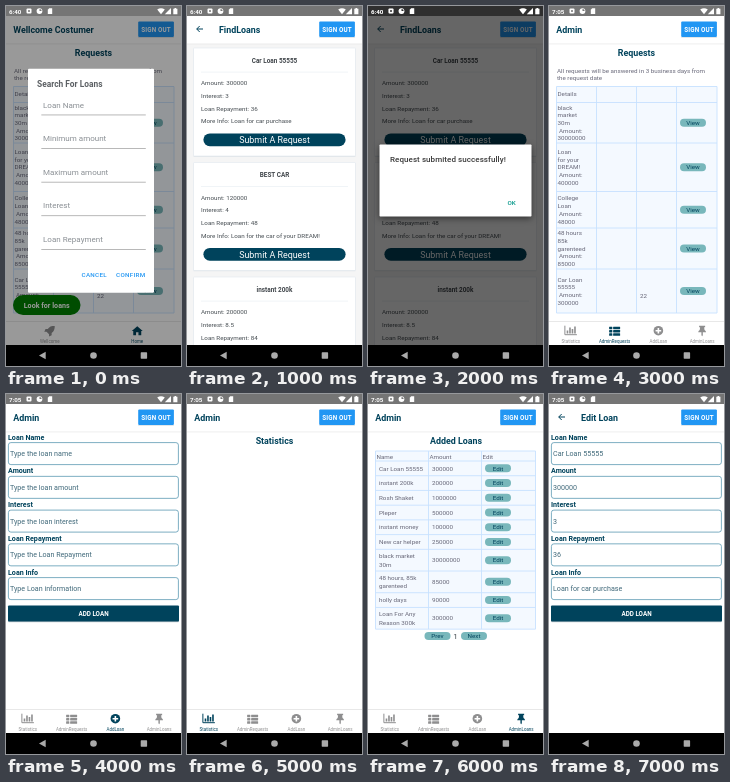
Recreate the animation shown at these times as an HTML page. Size 175x360 px, loop 8000 ms.

```html
<!DOCTYPE html>
<html lang="en">
<head>
<meta charset="utf-8">
<title>Loan app</title>
<style>
  html, body { margin: 0; width: 100%; height: 100%; overflow: hidden; background: #fff; }
  svg { display: block; width: 100%; height: 100%; font-family: Roboto, sans-serif; }
  .raised { filter: drop-shadow(0 2px 3px rgba(0, 0, 0, .5)); }
</style>
</head>
<body>
<svg id="stage" viewBox="0 0 175 360"></svg>
<script>
const NAVY = '#00435c', BLUE = '#2196f3', GREY = '#8e8e8f', TEAL = '#78b7bb';
const INK = '#444b50', CELL = '#667', LINE = '#c8e1ff';
const stage = document.getElementById('stage');

const rect = (x, y, w, h, fill, rx = 0, more = '') =>
  `<rect x="${x}" y="${y}" width="${w}" height="${h}" fill="${fill}" rx="${rx}" ${more}/>`;
const text = (s, x, y, size, fill, weight = 400, anchor = 'start', gap = 0) =>
  `<text x="${x}" y="${y}" font-size="${size}" fill="${fill}" font-weight="${weight}" text-anchor="${anchor}" letter-spacing="${gap}">${s}</text>`;
const mid = (s, x, y, size, fill, weight) => text(s, x, y, size, fill, weight, 'middle');
const path = (d, fill, more = '') => `<path d="${d}" fill="${fill}" ${more}/>`;
const line = (d, color, w) => path(d, 'none', `stroke="${color}" stroke-width="${w}"`);
const circle = (x, y, r, fill) => `<circle cx="${x}" cy="${y}" r="${r}" fill="${fill}"/>`;
const dim = (y, alpha) => rect(0, y, 175, 339 - y, '#000', 0, `opacity="${alpha}"`);

function statusIcons(time, bg = '#757575') {
  return text(time, 3, 7.5, 6.2, '#fff', 700) +
    rect(20.5, 2.6, 5, 5, '#fff', 1) + circle(23, 5.1, 1, bg) +
    circle(33.5, 5.1, 2.9, '#fff') + path('M33.5 5.1V2.9A2.2 2.2 0 0 1 35.7 5.1Z', bg) +
    path('M41.8 3.7L43.2 2.3H46.2V8H41.8Z', '#fff') +
    path('M151.2 3.5Q155 1 158.8 3.5L155 8.2Z', '#fff') +
    path('M165 2V8.200H158.800Z', '#fff') +
    path('M167.300 2.700H168.500V1.900H170.200V2.700H171.400V8.300H167.300Z', '#fff');
}

const statusBar = time => rect(0, 0, 175, 10, '#757575') + statusIcons(time);

function navBar() {
  return rect(0, 339, 175, 21, '#000') +
    path('M39.700 345.800V353.200L33 349.500Z', '#aaa') +
    circle(87.5, 349.5, 3.3, '#aaa') + rect(134.7, 346.3, 6.4, 6.4, '#aaa', .6);
}

function header(title, back) {
  const arrow = back ? line('M16 23H9.800M12.700 20L9.700 23L12.700 26', NAVY, 1) : '';
  return rect(0, 10, 175, 28, '#fff') + rect(0, 37.7, 175, .5, '#dcdcdc') + arrow +
    text(title, back ? 32 : 7.3, 26.5, 8.9, NAVY, 700) +
    rect(132.2, 15.6, 35.7, 15.4, BLUE, 1) + rect(132.2, 31, 35.7, .6, '#cfd8dc') +
    text('SIGN OUT', 150, 25.5, 6.3, '#fff', 700, 'middle', .15);
}

const icons = {
  chart: (x, y, c) => line(`M${x - 6} ${y - 5}V${y + 4}H${x + 6}`, c, 1) +
    [3, 6, 4.5, 7].map((h, i) => rect(x - 4.2 + i * 2.5, y + 2.8 - h, 1.6, h, c)).join(''),
  list: (x, y, c) => [-4, -.7, 2.6].map(d =>
    rect(x - 5.5, y + d, 3.2, 2.5, c, .4) + rect(x - 1.5, y + d, 7, 2.5, c, .4)).join(''),
  plus: (x, y, c) => circle(x, y, 4.8, c) +
    line(`M${x - 2.8} ${y}H${x + 2.8}M${x} ${y - 2.8}V${y + 2.8}`, '#fff', 1.6),
  pin: (x, y, c) => path(`M${x - 3} ${y - 5}h6v1.500h-1l.4 2.800q1.500.8 1.500 2.200h-3.200v3l-.7 1l-.7-1v-3h-3.200q0-1.400 1.500-2.200l.4-2.800h-1z`, c),
  rocket: (x, y, c) => path(`M${x + 5} ${y - 5}q-5 0-7 3.400h-2.200l-1.300 2.600h2.300l2.500 2.500v2.300l2.600-1.300v-2.200q3.300-2.200 3.100-7.300z`, c),
  home: (x, y, c) => path(`M${x} ${y - 4.5}l5.500 4.800h-1.500v4.200h-2.800v-3h-2.400v3h-2.800v-4.200h-1.500z`, c)
};

function tabs(items, active) {
  const w = 175 / items.length;
  return rect(0, 315, 175, 24, '#fff') + rect(0, 315, 175, .5, '#d0d0d0') +
    items.map(([name, icon], i) => {
      const x = w * (i + .5), c = i === active ? NAVY : GREY;
      return icons[icon](x, 324.7, c) + mid(name, x, 337, 4.46, c);
    }).join('');
}

const userTabs = [['Wellcome', 'rocket'], ['Home', 'home']];
const adminTabs = [['Statistics', 'chart'], ['AdminRequests', 'list'], ['AddLoan', 'plus'], ['AdminLoans', 'pin']];

const pill = (s, x, y) => rect(x - 13, y - 4, 26, 8, TEAL, 4) + mid(s, x, y + 2.2, 6.25, NAVY);

function grid(xs, ys) {
  const x0 = xs[0], x1 = xs[xs.length - 1], y0 = ys[0], y1 = ys[ys.length - 1];
  return rect(x0, y0, x1 - x0, y1 - y0, '#f4f9ff') +
    line(xs.map(x => `M${x} ${y0}V${y1}`).join('') + ys.map(y => `M${x0} ${y}H${x1}`).join(''), LINE, .9);
}

// Lines of text centred on height y.
const lines = (rows, x, y, step) => rows.map((s, k) =>
  text(s, s.startsWith('Amount') ? x + 1.5 : x, y + 2.2 + (k - (rows.length - 1) / 2) * step, 6.25, CELL)).join('');

const requests = [
  ['black', 'market', '30m', 'Amount:', '30000000'],
  ['Loan', 'for your', 'DREAM!', 'Amount:', '400000'],
  ['College', 'Loan', 'Amount:', '48000'],
  ['48 hours', '85k', 'garenteed', 'Amount:', '85000'],
  ['Car Loan', '55555', 'Amount:', '300000']
];

function requestPage() {
  const ys = [80.5, 96.5, 137, 185.5, 222, 263, 307];
  return mid('Requests', 87.5, 50, 8.9, NAVY, 700) +
    text('All requests will be answered in 3 business days from', 8, 66.5, 6.25, CELL) +
    text('the request date', 8, 74, 6.25, CELL) +
    grid([7.5, 47.5, 87.5, 127.5, 168], ys) + text('Details', 8.5, 90, 6.25, CELL) +
    requests.map((rows, i) => {
      const c = (ys[i + 1] + ys[i + 2]) / 2;
      return lines(rows, 8.5, c, 7.7) + pill('View', 144, c);
    }).join('') + text('22', 91, 291.5, 6.25, CELL);
}

function searchDialog() {
  const fields = ['Loan Name', 'Minimum amount', 'Maximum amount', 'Interest', 'Loan Repayment'];
  return dim(10, .4) + rect(22, 62.7, 126, 224, '#fff', 1) +
    text('Search For Loans', 31, 81, 8.4, '#5c6064', 700) +
    fields.map((s, i) => text(s, 37, 101.5 + i * 33.6, 8.03, '#8a8f94') +
      rect(35.3, 108.6 + i * 33.6, 104.5, .7, '#9a9a9a')).join('') +
    text('CANCEL', 75.5, 271, 6.25, BLUE, 500, 'start', .3) +
    text('CONFIRM', 110, 271, 6.25, BLUE, 500, 'start', .3);
}

function home() {
  return statusBar('6:40') + rect(0, 10, 175, 329, '#fff') + requestPage() +
    header('Wellcome Costumer') + rect(7, 289, 67.5, 20, '#008000', 10) +
    mid('Look for loans', 40.7, 301.7, 7.14, '#fff', 700) +
    tabs(userTabs, 1) + searchDialog() + navBar();
}

function card(y, title, amount, interest, months, info) {
  const rows = ['Amount: ' + amount, 'Interest: ' + interest, 'Loan Repayment: ' + months, 'More Info: ' + info];
  return rect(6.5, y + .7, 162, 108, '#dde2e6', .5) +
    rect(6.5, y, 162, 108, '#fff', .5, 'stroke="#e1e8ee" stroke-width=".6"') +
    mid(title, 87.5, y + 14.5, 6.4, '#43484d', 700) + rect(14, y + 23.8, 147, .5, '#e1e8ee') +
    rows.map((s, i) => text(s, 14, y + 37 + i * 12.8, 6.25, INK)).join('') +
    rect(16.4, y + 85.4, 142.2, 12.8, NAVY, 6.4) +
    mid('Submit A Request', 87.5, y + 95, 8.92, '#fff');
}

function findLoans() {
  return statusBar('6:40') + rect(0, 10, 175, 329, '#f5f5f5') +
    card(42, 'Car Loan 55555', 300000, 3, 36, 'Loan for car purchase') +
    card(156.5, 'BEST CAR', 120000, 4, 48, 'Loan for the car of your DREAM!') +
    card(271, 'instant 200k', 200000, 8.5, 84, 'Loan') +
    header('FindLoans', true) + navBar();
}

function submitted() {
  return findLoans() + dim(0, .6) + statusIcons('6:40', '#2f2f2f') +
    rect(11.5, 138.5, 152, 72, '#fff', .8, 'class="raised"') +
    text('Request submited successfully!', 22, 155.5, 8.03, '#3a3a3a', 500, 'start', .06) +
    text('OK', 139.5, 199, 6.25, '#009688', 500) + navBar();
}

const labels = ['Loan Name', 'Amount', 'Interest', 'Loan Repayment', 'Loan Info'];

function form(title, values, back) {
  return statusBar('7:05') + rect(0, 10, 175, 329, '#fff') + header(title, back) +
    labels.map((s, i) => {
      const y = i * 33.75;
      return text(s, 2, y + 45.7, 7.14, NAVY, 700) +
        rect(2.4, y + 48.6, 170, 22, '#fff', 2.5, 'stroke="#5c9ab3" stroke-width=".8"') +
        text(values[i], 4, y + 62.2, 7.14, '#40697a');
    }).join('') +
    rect(2, 212, 171, 16.3, '#c3cbd0', 1) + rect(2, 211.5, 171, 16, NAVY, 1) +
    mid('ADD LOAN', 87.5, 221.8, 6.3, '#fff', 700) + navBar();
}

function addLoan() {
  const hints = ['the loan name', 'the loan amount', 'the loan interest', 'the Loan Repayment', 'Loan information'];
  return form('Admin', hints.map(s => 'Type ' + s)) + tabs(adminTabs, 2);
}

const editLoan = () => form('Edit Loan', ['Car Loan 55555', 300000, 3, 36, 'Loan for car purchase'], true);

function adminPage(body, tab) {
  return statusBar('7:05') + rect(0, 10, 175, 329, '#fff') + body +
    header('Admin') + tabs(adminTabs, tab) + navBar();
}

const loans = [
  ['Car Loan 55555', 300000], ['instant 200k', 200000], ['Rosh Shaket', 1000000], ['Pleper', 500000],
  ['instant money', 100000], ['New car helper', 250000], ['black market|30m', 30000000],
  ['48 hours, 85k|garenteed', 85000], ['holly days', 90000], ['Loan For Any|Reason 300k', 300000]
];

function loanTable() {
  const ys = [57, 67];
  let cells = ['Name', 'Amount', 'Edit'].map((s, i) => text(s, 8.5 + i * 53, 64.5, 6.25, CELL)).join('');
  loans.forEach(([name, amount]) => {
    const rows = name.split('|'), top = ys[ys.length - 1], h = rows.length > 1 ? 21.7 : 14.72;
    const c = top + h / 2;
    cells += lines(rows, 11, c, 8.6) + text(amount, 64, c + 2.2, 6.25, CELL) + pill('Edit', 130, c);
    ys.push(top + h);
  });
  return mid('Added Loans', 88, 49.5, 8.9, NAVY, 700) + grid([7.5, 60.5, 113.5, 167.5], ys) + cells +
    pill('Prev', 69.5, 242) + mid('1', 87.5, 244.8, 8, INK) + pill('Next', 106, 242);
}

const scenes = [
  home, findLoans, submitted,
  () => adminPage(requestPage(), 1),
  addLoan,
  () => adminPage(mid('Statistics', 87.5, 50, 8.9, NAVY, 700), 0),
  () => adminPage(loanTable(), 3),
  editLoan
];

let shown = -1;
function draw(now) {
  const i = Math.floor(now % 8000 / 1000);
  if (i !== shown) stage.innerHTML = scenes[shown = i]();
}
function tick() {
  draw(performance.now());
  requestAnimationFrame(tick);
}
tick();
</script>
</body>
</html>
```
